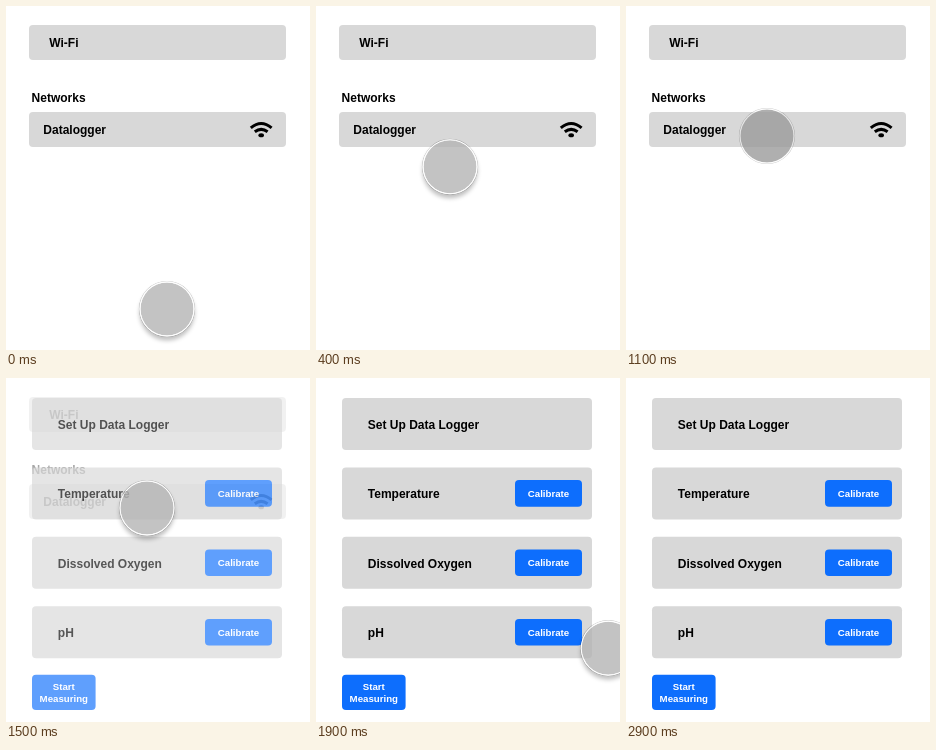
Write an HTML page that moves like this. It is 304x344 px and loops after 3000 ms.

```html
<!DOCTYPE html>
<html lang="en">
<head>
<meta charset="utf-8">
<title>Data logger setup</title>
<style>
  html, body { margin: 0; width: 100%; height: 100%; overflow: hidden; background: #fff; }
  #stage { position: relative; width: 304px; height: 344px; overflow: hidden; }
  svg { position: absolute; left: 0; top: 0; }
  text { font: bold 12px "Liberation Sans", Arial, sans-serif; }
  .bar { fill: #d8d8d8; }
  .button rect { fill: #0d6efd; }
  .button text { fill: #fff; font-size: 9.7px; text-anchor: middle; }
  .wifi { fill: none; stroke: #000; stroke-width: 3; }
  #setup { opacity: 0; }
  #touch {
    position: absolute; left: -27.5px; top: -27.5px;
    box-sizing: border-box; width: 55px; height: 55px;
    border: 1.2px solid #fff; border-radius: 50%;
    background-clip: padding-box;
  }
</style>
</head>
<body>
<div id="stage">
  <svg width="304" height="344" viewBox="0 0 304 344">
    <g id="networks">
      <rect class="bar" x="23" y="19" width="257" height="35" rx="4"/>
      <text x="43.3" y="41">Wi-Fi</text>
      <text x="25.6" y="96">Networks</text>
      <rect class="bar" x="23" y="106" width="257" height="35" rx="4"/>
      <text x="37.3" y="128.3">Datalogger</text>
      <g class="wifi">
        <path d="M244.8 121.8Q255.2 113.2 265.6 121.8"/>
        <path d="M248.8 125.8Q255.2 121 261.6 125.8"/>
      </g>
      <ellipse cx="255.2" cy="129.2" rx="2.8" ry="2"/>
    </g>
    <g id="setup"></g>
  </svg>
  <div id="touch"></div>
</div>
<script>
  const LOOP = 3000, STEP = 100;
  const [networks, setup, touch] =
    ["networks", "setup", "touch"].map(id => document.getElementById(id));

  const button = (x, y, w, h, lines) => `<g class="button">
    <rect x="${x}" y="${y}" width="${w}" height="${h}" rx="4"/>` +
    lines.map((line, i) => {
      const base = y + h / 2 + 3.6 + (i - (lines.length - 1) / 2) * 11.6;
      return `<text x="${x + w / 2}" y="${base}">${line}</text>`;
    }).join("") + "</g>";

  const row = (label, i) => {
    const y = 20 + i * 69.4;
    return `<rect class="bar" x="26" y="${y}" width="250" height="52" rx="4"/>
      <text x="51.8" y="${y + 30.8}">${label}</text>` +
      (i ? button(199, y + 12.7, 67, 26.6, ["Calibrate"]) : "");
  };

  setup.innerHTML =
    ["Set Up Data Logger", "Temperature", "Dissolved Oxygen", "pH"].map(row).join("") +
    button(26, 296.7, 63.6, 35.3, ["Start", "Measuring"]);

  // Eased progress from 0 to 1 between two times
  const easeOut = (t, from, to, power = 2) => {
    const p = Math.min(1, Math.max(0, (t - from) / (to - from)));
    return 1 - (1 - p) ** power;
  };

  function draw(t) {
    const fade = easeOut(t, 1350, 1710);
    networks.style.opacity = 1 - fade;
    setup.style.opacity = fade;

    const settle = easeOut(t, 600, 1050);
    const leave = easeOut(t, 1500, 2320);
    const x = 160.5 - 28 * easeOut(t, 0, 600, 3) + 8 * settle + 205 * leave;
    const y = 302.5 - 158 * easeOut(t, 0, 585) - 15 * settle + 190 * leave;
    touch.style.transform = `translate(${x}px, ${y}px)`;

    const press = easeOut(t, 800, 1100, 1) - easeOut(t, 1350, 1500, 1);
    const grey = 181 - 25 * press;
    touch.style.backgroundColor = `rgba(${grey}, ${grey}, ${grey}, .8)`;
    touch.style.borderColor = `rgba(255, 255, 255, ${1 - 0.6 * press})`;
    touch.style.boxShadow =
      `0 0 0 .6px rgba(0, 0, 0, .2), 0 4px 4px rgba(0, 0, 0, ${0.25 * (1 - press)})`;
  }

  // The motion advances ten times a second
  function tick() {
    const t = Math.floor((performance.now() + 20) / STEP) * STEP;
    draw(t % LOOP);
    requestAnimationFrame(tick);
  }
  tick();
</script>
</body>
</html>
```
